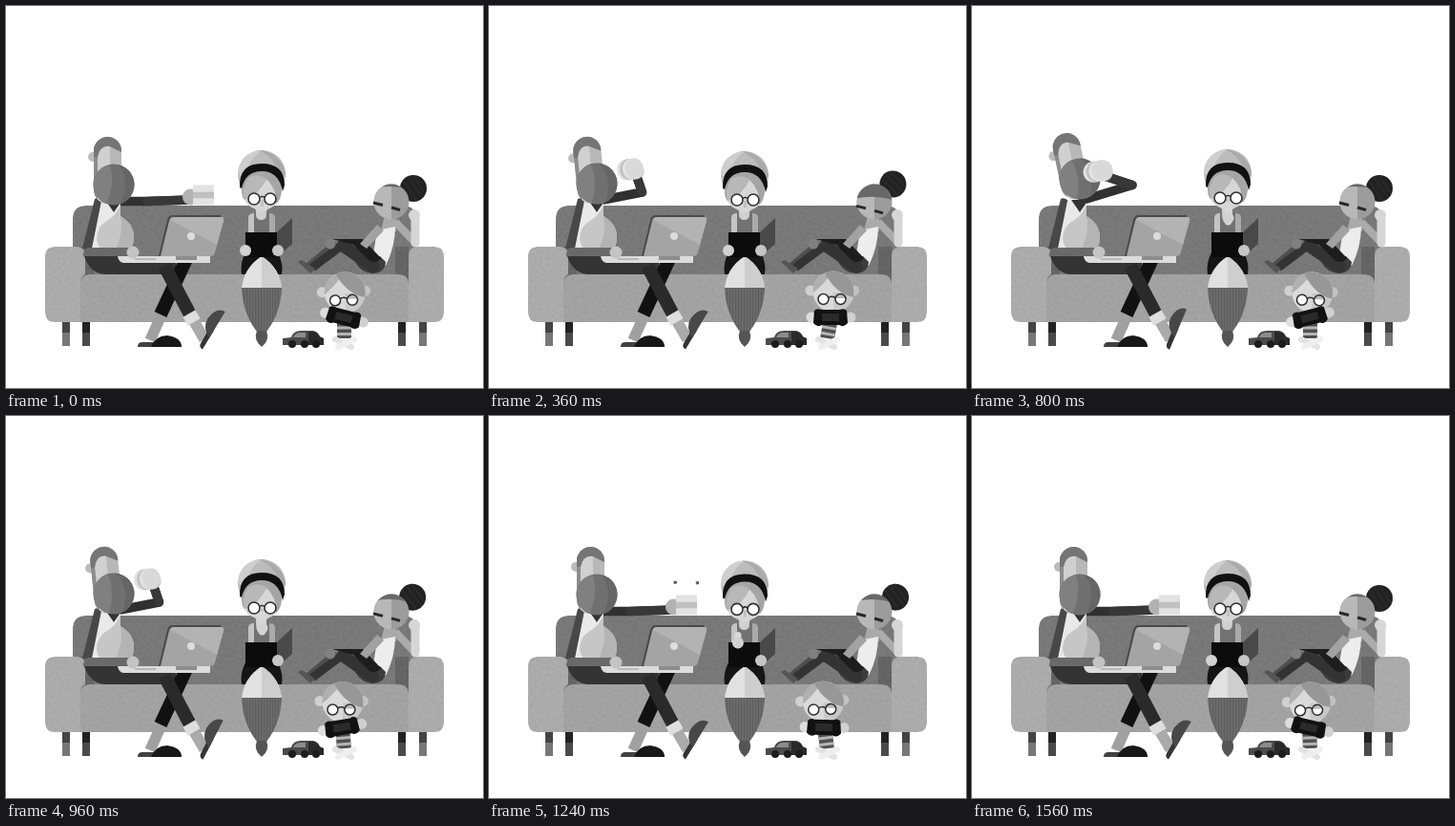
These frames come from a looping animation (500 px wide and 400 px high, 1.6 s). An HTML page:

```html
<!DOCTYPE html>
<html lang="en">
<head>
<meta charset="utf-8">
<title>Family on a sofa</title>
<style>
html, body { margin: 0; width: 100%; height: 100%; overflow: hidden; background: #fff; }
svg { display: block; width: 100vw; height: 100vh; }
</style>
</head>
<body>
<svg viewBox="0 0 500 400" fill="none">
<defs>
  <filter id="grain" x="0" y="0" width="1" height="1" color-interpolation-filters="sRGB">
    <feTurbulence type="fractalNoise" baseFrequency=".3" numOctaves="3" seed="7"/>
    <feColorMatrix values="1 0 0 0 0 1 0 0 0 0 1 0 0 0 0 0 0 0 0 1"/>
    <feComposite in="SourceGraphic" operator="arithmetic" k2="1" k3=".06" k4="-.03"/>
    <feComposite in2="SourceGraphic" operator="in"/>
  </filter>
  <pattern id="knit" width="3" height="8" patternUnits="userSpaceOnUse">
    <path fill="#6a6a6a" d="M0 0h3v8H0z"/><path fill="#5e5e5e" d="M0 0h1v8H0z"/>
  </pattern>
  <clipPath id="manHead"><rect x="92" y="137" width="29" height="70" rx="14.5"/></clipPath>
  <clipPath id="beard"><circle cx="113" cy="187" r="21.5"/></clipPath>
  <clipPath id="bunClip"><circle cx="427" cy="191" r="14"/></clipPath>
  <clipPath id="girlFace"><circle cx="404" cy="205" r="18.5"/></clipPath>
  <clipPath id="mumHair"><circle cx="268" cy="176" r="25"/></clipPath>
  <clipPath id="kidFace"><circle cx="361" cy="299" r="21.5"/></clipPath>
  <clipPath id="lens"><circle cx="368.5" cy="307" r="5.5"/></clipPath>
</defs>

<g id="sofa">
  <g id="legs"></g>
  <g filter="url(#grain)">
    <path fill="#787878" d="M70 300V223Q70 209 84 209H416Q430 209 430 223V300Z"/>
    <path fill="#646464" d="M78 292V252H92V281ZM422 292V252H408V281Z"/>
    <path fill="#a2a2a2" d="M78 331V292Q78 281 89 281H411Q422 281 422 292V331Z"/>
    <path fill="#ababab" d="M41 262Q41 252 51 252H74Q83 252 83 262V281Q78 283 78 292V331H51Q41 331 41 321Z"/>
    <path fill="#ababab" d="M459 262Q459 252 449 252H432Q422 252 422 262V281Q422 283 422 292V331H449Q459 331 459 321Z"/>
  </g>
</g>

<g id="man">
  <path fill="#343434" d="M82 262H178V281H104Q88 280 82 262Z"/>
  <path fill="#484848" d="M93 202Q97 200 101 204L90 254H80Z"/>
  <path id="arm" stroke="#303030" stroke-width="9.5" stroke-linejoin="round"/>
  <path id="foreArm" stroke="#383838" stroke-width="9.5" stroke-linecap="round"/>
  <path fill="#e9e9e9" d="M100 204H120V254H90Z"/>
  <path fill="#c6c6c6" d="M120 208V220Q134 228 134 242Q134 254 126 258H104Q95 252 95 243Q96 230 106 225Q116 219 120 208Z"/>
  <path fill="#b4b4b4" d="M120 220Q134 228 134 242Q134 254 126 258H113Q124 238 120 220Z"/>
  <path fill="#333" d="M104 203H122L113 216Z"/>
  <g id="head">
    <circle cx="91" cy="158" r="5" fill="#bbb"/>
    <g clip-path="url(#manHead)">
      <path fill="#b8b8b8" d="M92 130H122V210H92Z"/>
      <path fill="#d0d0d0" d="M96 145H109V205H96Z"/>
      <path fill="#8c8c8c" d="M90 145H96V205H90Z"/>
      <path fill="#757575" d="M90 135H123V154Q116 151 109 147Q99 145 96 158H90Z"/>
    </g>
    <g clip-path="url(#beard)">
      <path fill="#707070" d="M90 164H136V210H90Z"/>
      <path fill="#808080" d="M90 164H108Q116 185 104 210H90Z"/>
      <path fill="#666" d="M116 164Q133 185 118 210H137V164Z"/>
    </g>
  </g>
  <circle id="hand" r="8.5" fill="#b2b2b2"/>
  <g id="cup">
    <path id="side" fill="#e2e2e2"/>
    <path id="band" fill="#c0c0c0"/>
    <ellipse id="base" rx="11" fill="#d9d9d9"/>
  </g>
  <g id="steam" stroke="#606060" stroke-width="3" stroke-dasharray="14 30">
    <path d="M204.500 181Q202 175 193.500 174"/><path d="M209 181Q212 175 220 174.500"/>
  </g>

  <path stroke="#a0a0a0" stroke-width="11.500" d="M165 319L151 350"/>
  <path stroke="#111" stroke-width="14" d="M189 265L162 323"/>
  <path stroke="#aaa" stroke-width="11.500" d="M194 325L208 349"/>
  <path stroke="#2a2a2a" stroke-width="14" d="M166 272L194 325"/>
  <path stroke="#dedede" stroke-width="15" d="M192 322L197 331"/>
  <g id="loafer" transform="translate(138 357)">
    <path fill="#414141" d="M0 0Q0-5 5-5H24V0Z"/>
    <path fill="#171717" d="M14 0Q19-12 31-12Q46-10 46 0Z"/>
  </g>
  <g id="shoe">
    <g transform="translate(206 359.500) rotate(-59)">
      <path fill="#343434" d="M0 0Q0-5 5-5H24V0Z"/>
      <path fill="#484848" d="M14 0Q19-12 31-12Q46-10 46 0Z"/>
    </g>
  </g>

  <path fill="#696969" d="M86 253H129V262H81Q80 257 86 253Z"/>
  <path fill="#dcdcdc" d="M117 262H214V269H123Q118 268 117 262Z"/>
  <path fill="#b8b8b8" d="M135 264H157V266H135Z"/>
  <path fill="#4a4a4a" d="M160 262L169 224Q170 219 175 219H225L226 222L166 262Z"/>
  <path fill="#a4a4a4" d="M162 262L171 225Q172 221 176 221H225Q229 221 228 225L219 258Q218 262 214 262Z"/>
  <path fill="#b3b3b3" d="M172 224Q173 221 176 221H225Q229 221 228 225L221 250Z"/>
  <path fill="#8d8d8d" d="M178 262H200V266H178Z"/>
  <circle cx="194" cy="241" r="4" fill="#ddd"/>
  <circle cx="133" cy="258" r="6.5" fill="#c4c4c4"/>
</g>

<g id="mum">
  <path fill="#c4c4c4" d="M254 222Q254 217 260 217H268V240H254Z"/>
  <path fill="#aaa" d="M268 217H276Q282 217 282 222V240H268Z"/>
  <path fill="#727272" d="M260 217H276V240H260Z"/>
  <path fill="#d0d0d0" d="M262 208H273V218Q273 224 267.500 224Q262 224 262 218Z"/>
  <path fill="#151515" d="M251 258H285Q291 270 289 281H247Q245 270 251 258Z"/>
  <path fill="#e1e1e1" d="M247 296Q249 274 268 262Q287 274 289 296Z"/>
  <path fill="#cecece" d="M268 262Q287 274 289 296H268Z"/>
  <path fill="url(#knit)" d="M247 295H289Q288 322 273 341H263Q248 322 247 295Z"/>
  <path fill="#555" d="M263 340H273Q277 350 268 357Q259 350 263 340Z"/>
  <path fill="#494949" d="M284 237L300 222V249L284 263Z"/>
  <path fill="#0c0c0c" d="M251 237H284V263H251Z"/>
  <g id="mumHead">
    <circle cx="268" cy="176" r="25" fill="#bcbcbc"/>
    <g clip-path="url(#mumHair)">
      <path fill="#cecece" d="M243 176Q246 149 270 150Q254 159 251 180Z"/>
      <path fill="#aaa" d="M263 150Q291 154 294 180L285 174Q282 158 263 150Z"/>
    </g>
    <path fill="#d7d7d7" d="M247 190Q249 171 268 171Q287 171 289 190Q288 208 276 212Q268 219 260 212Q248 208 247 190Z"/>
    <path fill="#a5a5a5" d="M247 193Q248 172 268 172Q288 172 289 193Q288 204 283 207Q284 191 273 181Q266 196 250 203Q247 200 247 193Z"/>
    <path fill="#b8b8b8" d="M273 181Q266 196 250 203Q246 192 254 180Q263 174 273 181Z"/>
    <path fill="#111" d="M245 190Q244 165 268 165Q292 165 292 188L290 194Q286 173 268 173Q251 173 247 191Z"/>
    <g fill="#fff" stroke="#303030" stroke-width="1.600">
      <circle cx="260" cy="202" r="6"/><circle cx="277" cy="202" r="6"/>
      <path d="M266 200.500Q268.500 198.500 271 200.500"/>
    </g>
    <path fill="#c2c2c2" d="M267 203H270V210H267Z"/>
  </g>
  <path id="finger" stroke="#d8d8d8" stroke-width="7" stroke-linecap="round"/>
  <circle id="mumHand" r="6" fill="#d2d2d2"/>
  <circle cx="285" cy="256" r="6" fill="#c6c6c6"/>
</g>

<g id="girl">
  <path stroke="#ababab" stroke-width="8" d="M408 226L430 249"/>
  <path stroke="#d6d6d6" stroke-width="9" stroke-linecap="round" d="M429 220V248"/>
  <circle cx="428" cy="219" r="6" fill="#d6d6d6"/>
  <path fill="#aaa" d="M397 219H409V236H393Z"/>
  <path fill="#ededed" d="M389 235L408 231Q408 252 398 272L384 266Z"/>
  <path fill="#3c3c3c" d="M392 262L398 268Q397 280 384 280Q372 279 366 268Z"/>
  <path stroke="#4e4e4e" stroke-width="7" d="M316 273L346 248"/>
  <path stroke="#333" stroke-width="9" d="M321 274L353 250"/>
  <path stroke="#333" stroke-width="13" stroke-linecap="round" d="M353 251L385 273"/>
  <path fill="#555" d="M306 268L310 266L324 275L319 280Z"/>
  <path fill="#1d1d1d" d="M342 244H374L393 264Q389 270 381 267L364 250Z"/>
  <path fill="#a2a2a2" d="M389 229L396 235L378 254L371 249Z"/>
  <circle cx="340" cy="249" r="5.500" fill="#808080"/>
  <g id="bun">
    <circle cx="427" cy="191" r="14" fill="#222"/>
    <g clip-path="url(#bunClip)" stroke="#303030">
      <path d="M415 181l16 24M420 177l16 24M426 176l14 22"/>
    </g>
  </g>
  <circle cx="404" cy="205" r="18.500" fill="#9c9c9c"/>
  <g clip-path="url(#girlFace)">
    <path fill="#b8b8b8" d="M385 186H404V225H385Z"/>
    <path id="fringe" fill="#686868" d="M380 165H428V194Q404 185 380 192Z"/>
  </g>
  <path id="eyes" stroke="#292929" stroke-width="3" d="M385 206l10 2.500M404 211l9 2.500"/>
</g>

<g id="car">
  <path fill="#4b4b4b" d="M290 348L299 347Q301 340 309 340H322Q327 341 329 346L333 348V355H290Z"/>
  <path fill="#8c8c8c" d="M301 347Q303 342 309 342H314V347Z"/>
  <path fill="#292929" d="M317 341H323Q328 343 329 347L333 348V355H317Z"/>
  <g fill="#1c1c1c"><circle cx="300" cy="354" r="4"/><circle cx="313" cy="354" r="4"/><circle cx="325" cy="354" r="4"/></g>
</g>

<g id="kid">
  <g id="kidBody">
    <path fill="#505050" d="M347 328H362V348H347Z"/>
    <path stroke="#b5b5b5" stroke-width="3" d="M347 337H362M347 343.500H362"/>
  </g>
  <path stroke="#e2e2e2" stroke-width="6" stroke-linecap="round" d="M345 349L362 357"/>
  <path stroke="#efefef" stroke-width="6" stroke-linecap="round" d="M365 349L348 357"/>
  <g id="kidHead">
    <circle cx="337" cy="298" r="5.500" fill="#d0d0d0"/><circle cx="382.500" cy="298" r="5.500" fill="#c2c2c2"/>
    <g clip-path="url(#kidFace)">
      <path fill="#dadada" d="M338 276H384V322H338Z"/>
      <path fill="#c8c8c8" d="M361 300H384V322H361Z"/>
      <path fill="#b0b0b0" d="M338 298Q342 276 362 276Q354 289 338 302Z"/>
      <path fill="#979797" d="M351 278Q373 274 384 292V305Q364 303 351 278Z"/>
    </g>
    <circle cx="350.500" cy="307" r="5.500" fill="#fff"/>
    <circle cx="368.500" cy="307" r="5.500" fill="#fff"/>
    <path clip-path="url(#lens)" fill="#bbb" d="M362 300H375V306H362Z"/>
    <g stroke="#303030" stroke-width="1.500">
      <circle cx="350.500" cy="307" r="5.500"/><circle cx="368.500" cy="307" r="5.500"/>
      <path d="M356 305.500Q359 303 363 305.500"/>
    </g>
  </g>
  <g id="pad">
    <circle cx="-20" cy="0" r="5.500" fill="#dedede"/><circle cx="21" cy="0" r="5.500" fill="#d0d0d0"/>
    <path fill="#111" d="M-17-7Q-14-10-10-8H10Q14-10 17-7L18 6Q14 11 9 8H-9Q-14 11-18 6Z"/>
    <path fill="#2a2a2a" d="M-9-4H9V4H-9Z"/>
  </g>
</g>
</svg>

<script>
const LOOP = 1600, STEP = 40;
const $ = id => document.getElementById(id);
const set = (id, name, value) => $(id).setAttribute(name, value);
const move = (id, value) => set(id, 'transform', value);

// Smooth periodic curve through (times, values), without overshoot.
function track(times, values) {
  const n = times.length;
  const at = i => times[(i + n) % n] + LOOP * Math.floor(i / n);
  const val = i => values[(i + n) % n];
  const slope = i => (val(i + 1) - val(i)) / (at(i + 1) - at(i));
  const tangent = i => {
    const a = slope(i - 1), b = slope(i);
    return a * b > 0 ? 2 * a * b / (a + b) : 0;
  };
  return t => {
    let i = n - 1;
    while (times[i] > t) i--;
    const h = at(i + 1) - at(i), u = (t - at(i)) / h, v = 1 - u;
    return val(i) * (1 + 2 * u) * v * v + tangent(i) * h * u * v * v
      + val(i + 1) * u * u * (3 - 2 * u) - tangent(i + 1) * h * u * u * v;
  };
}

const beats = [0, 360, 520, 800, 1120, 1400, 1560];
const onBeat = (...values) => track(beats, values);

// Resting, half raised and drinking values make one sip.
const sip = (rest, mid, top) =>
  track([0, 100, 360, 520, 800, 960, 1120], [rest, rest, mid, top, top, mid, rest]);

const man = {
  elbowX: sip(148, 160.5, 168), elbowY: sip(204.5, 195, 187.5),
  handX: sip(193.5, 154, 139), handY: sip(203, 176, 178),
  cupX: sip(207, 148, 132), cupY: sip(198, 171, 173),
  turn: sip(0, -97, -100),
  depth: sip(10.5, 4.5, 4.5), round: sip(0, 9.5, 11),
  tilt: sip(0, -6, -12), lift: sip(0, -1, -6),
  shoe: onBeat(0, 0, 0, -8, 1, 0, 0)
};
const steam = track([0, 1000, 1100, 1160, 1280], [0, 0, 1, 1, 0]);

const mum = {
  nod: onBeat(0, 1, 2.5, -1, -1, 2.5, 0),
  lick: track([0, 360, 500, 1140, 1360], [0, 0, 1, 1, 0])
};
const girlTilt = onBeat(0, -12, 1, 0, -6, 0.5, 0);
const kid = {
  x: onBeat(-5, 0, -1, -5, -10, -9, -6),
  y: onBeat(1, 0, 0, 1, 0, 0.5, 1),
  tilt: onBeat(-2, 0, 0, 2, -2, -2, -2),
  padX: onBeat(354, 358, 357.5, 354, 351, 351.5, 353),
  padTilt: onBeat(14, 0, -3, -14, -3, 7, 13)
};

// Strip around the cup between two heights, bent by the view angle.
const ring = (top, bottom, ry, flip) =>
  `M-11 ${top}A11 ${ry} 0 0 1 11 ${top}V${bottom}A11 ${ry} 0 0 ${flip} -11 ${bottom}Z`;

function poseMan(t) {
  const [ex, ey] = [man.elbowX(t), man.elbowY(t)];
  const [hx, hy] = [man.handX(t), man.handY(t)];
  set('arm', 'd', `M112 204.5L${ex} ${ey}L${hx} ${hy}`);
  set('foreArm', 'd', `M${ex} ${ey}L${hx} ${hy}`);
  move('hand', `translate(${hx} ${hy - 3})`);

  const h = man.depth(t), ry = Math.max(0.01, man.round(t));
  move('cup', `translate(${man.cupX(t)} ${man.cupY(t)}) rotate(${man.turn(t)})`);
  set('side', 'd', ring(-h, h, ry, 1));
  set('band', 'd', ring(-0.3 * h, 0.3 * h, ry, 0));
  set('base', 'cy', h);
  set('base', 'ry', ry);

  move('head', `translate(0 ${man.lift(t)}) rotate(${man.tilt(t)} 113 187)`);
  move('shoe', `rotate(${man.shoe(t)} 209 352)`);

  const puff = steam(t);
  set('steam', 'opacity', puff > 0.1 ? 1 : 0);
  set('steam', 'stroke-dashoffset', t < 1130 ? 14 * (1 - puff) : -14 * (1 - puff));
}

function poseMum(t) {
  const lick = mum.lick(t), nod = mum.nod(t);
  const x = 251 + 17.5 * lick, y = 256 - 33 * lick + nod * lick;
  move('mumHead', `translate(0 ${nod})`);
  move('mumHand', `translate(${x} ${y})`);
  set('finger', 'd', `M${x} ${y + 4 * lick}V${y - 14 * lick}`);
}

function poseGirl(t) {
  const tilt = girlTilt(t);
  move('bun', `rotate(${tilt} 404 206)`);
  move('fringe', `translate(0 ${-tilt * 0.9})`);
  move('eyes', `translate(0 ${-tilt * 0.28})`);
}

function poseKid(t) {
  const x = kid.padX(t);
  const lean = Math.atan2(x - 354, 23) * 180 / Math.PI;
  move('kidHead', `translate(${kid.x(t)} ${kid.y(t)}) rotate(${kid.tilt(t)} 361 320)`);
  move('pad', `translate(${x} 326) rotate(${kid.padTilt(t)})`);
  move('kidBody', `rotate(${lean} 355 349)`);
}

$('legs').innerHTML = [59, 80, 411, 433].map((x, i) => {
  const [top, foot] = i % 3 ? ['#222', '#4a4a4a'] : ['#444', '#777'];
  return `<path fill="${top}" d="M${x} 330h8v13h-8z"/><path fill="${foot}" d="M${x} 342h8v14h-8z"/>`;
}).join('');

function frame(now) {
  const t = Math.floor(now % LOOP / STEP) * STEP;
  for (const pose of [poseMan, poseMum, poseGirl, poseKid]) pose(t);
  requestAnimationFrame(frame);
}
frame(0);
</script>
</body>
</html>
```
